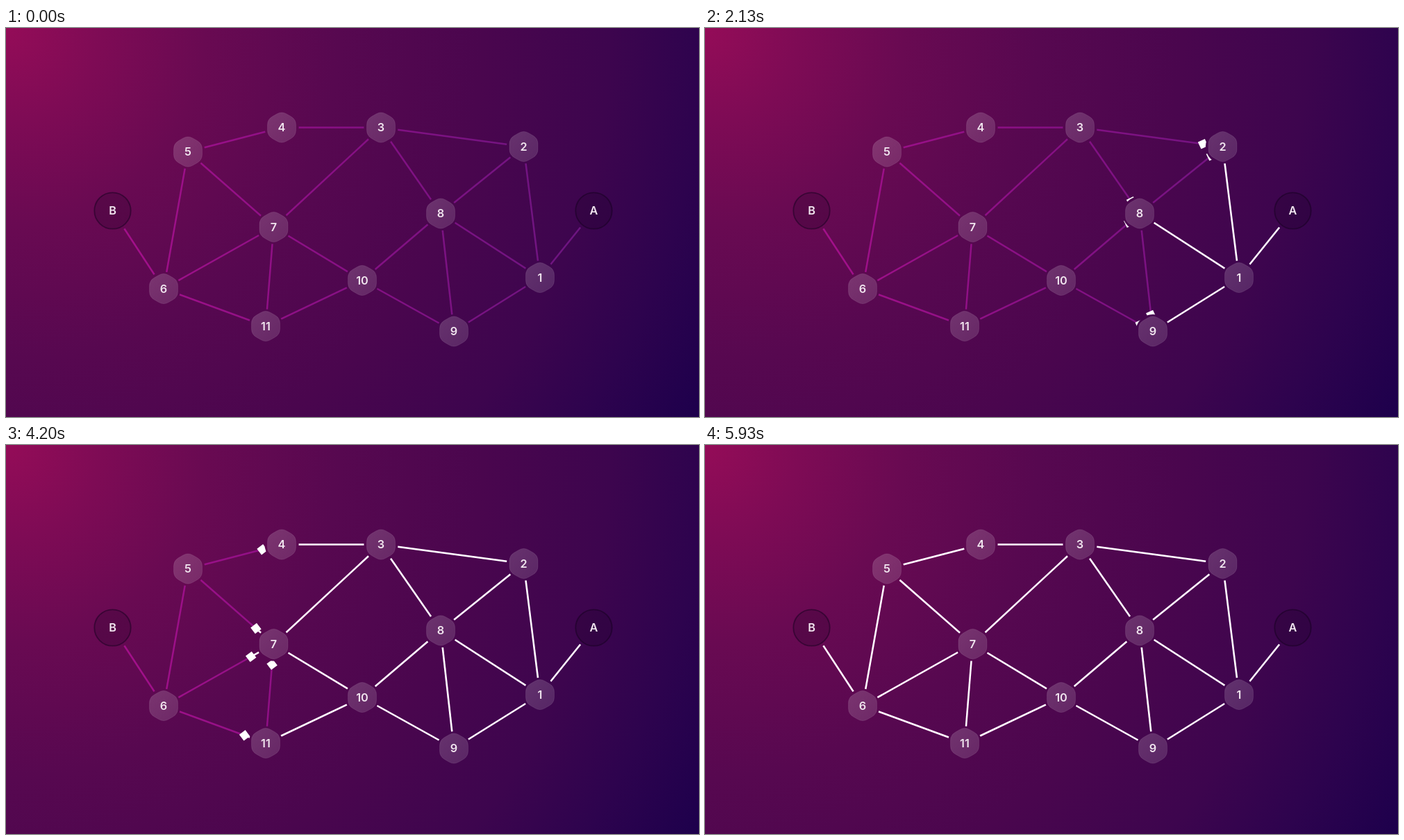
Write an HTML page that moves like this. It is 998 px wide and 561 px high and loops after 5990 ms.

```html
<!DOCTYPE html>
<html lang="en">
<head>
<meta charset="utf-8">
<title>Network flooding</title>
<style>
  html, body { margin: 0; width: 100%; height: 100%; overflow: hidden; background: #4a064e; }
  svg { display: block; width: 100vw; height: 100vh; }
  text { font: 600 16.3px Montserrat, Inter, sans-serif; fill: #f1e6ef; text-anchor: middle; }
</style>
</head>
<body>
<svg id="stage" viewBox="0 0 998 561">
  <defs>
    <radialGradient id="sky" gradientUnits="userSpaceOnUse" cx="0" cy="0" r="1145">
      <stop offset="0" stop-color="#940c58"/>
      <stop offset=".12" stop-color="#7e0b55"/>
      <stop offset=".25" stop-color="#690a52"/>
      <stop offset=".42" stop-color="#570850"/>
      <stop offset=".6" stop-color="#4a064e"/>
      <stop offset=".76" stop-color="#3d054e"/>
      <stop offset=".88" stop-color="#2d034e"/>
      <stop offset="1" stop-color="#1d004c"/>
    </radialGradient>
    <linearGradient id="wire" gradientUnits="userSpaceOnUse" x1="170" y1="0" x2="830" y2="0">
      <stop offset="0" stop-color="#a3108a"/>
      <stop offset=".5" stop-color="#861084"/>
      <stop offset="1" stop-color="#6c1580"/>
    </linearGradient>
    <linearGradient id="glass" x1="0" y1="0" x2="1" y2="1">
      <stop offset="0" stop-color="#fff" stop-opacity=".18"/>
      <stop offset="1" stop-color="#fff" stop-opacity=".13"/>
    </linearGradient>
    <mask id="gaps" maskUnits="userSpaceOnUse" x="0" y="0" width="998" height="561">
      <rect width="998" height="561" fill="#fff"/>
    </mask>
  </defs>
  <rect width="998" height="561" fill="url(#sky)"/>
  <g mask="url(#gaps)" stroke-width="2.5">
    <g id="wires" stroke="url(#wire)"></g>
    <g id="signals" stroke="#fff"></g>
    <g id="packets" fill="#fff"></g>
  </g>
  <g id="nodes"></g>
</svg>
<script>
const LOOP = 5990;
const FRAMES_PER_STAGE = 15;
const TRAVEL_FRAMES = 14.5;

const nodes = {
  A: [846.5, 263.5], B: [153.5, 263.5],
  1: [769, 360], 2: [745.5, 171], 3: [540, 143.5], 4: [397, 143.5],
  5: [262, 178.5], 6: [227, 376], 7: [385.5, 287], 8: [626, 267.5],
  9: [645, 437.5], 10: [513, 364], 11: [374, 430]
};

const stages = [
  "A-1",
  "1-2 1-8 1-9",
  "2-3 2-8 8-3 8-10 9-8 9-10",
  "3-4 3-7 10-7 10-11",
  "4-5 7-5 7-6 7-11 11-6",
  "5-6 6-B"
];

const byId = id => document.getElementById(id);

function add(parent, tag, attrs) {
  const el = document.createElementNS("http://www.w3.org/2000/svg", tag);
  for (const key in attrs) el.setAttribute(key, attrs[key]);
  return parent.appendChild(el);
}

// Pointy-top hexagon with softened corners.
function hexPath(radius, cut) {
  const corner = k => {
    const a = (k * 60 - 90) * Math.PI / 180;
    return [radius * Math.cos(a), radius * Math.sin(a)];
  };
  const toward = (p, q) => p.map((v, i) => v + (q[i] - v) * cut / radius);
  let d = "";
  for (let k = 0; k < 6; k++) {
    const c = corner(k);
    d += `${k ? "L" : "M"}${toward(c, corner(k - 1))}Q${c} ${toward(c, corner(k + 1))}`;
  }
  return d + "Z";
}

const hex = hexPath(23.6, 8);

for (const [name, [x, y]] of Object.entries(nodes)) {
  const terminal = isNaN(name);
  add(byId("gaps"), "circle", { cx: x, cy: y, r: terminal ? 31 : 24.6 });
  const group = add(byId("nodes"), "g", { transform: `translate(${x} ${y})` });
  if (terminal) {
    add(group, "circle", { r: 26.2, fill: "#14001f", "fill-opacity": .2,
      stroke: "#14001f", "stroke-opacity": .5, "stroke-width": 1.8 });
  } else {
    add(group, "path", { d: hex, fill: "url(#glass)", stroke: "#fff", "stroke-opacity": .1 });
  }
  add(group, "text", { y: 5.9 }).textContent = name;
}

const edges = stages.flatMap((list, stage) => list.split(" ").map(pair => {
  const [from, to] = pair.split("-").map(n => nodes[n]);
  const start = { x1: from[0], y1: from[1] };
  // The tiny offset keeps horizontal wires from having an empty bounding box.
  add(byId("wires"), "line", { ...start, x2: to[0], y2: to[1] + .01 });
  return {
    stage, from, to,
    signal: add(byId("signals"), "line", { ...start, x2: from[0], y2: from[1] }),
    packet: add(byId("packets"), "rect", { x: -5.5, y: -5.5, width: 11, height: 11 })
  };
}));

// Frames last 70, 60 and 70 ms in turn.
function frameAt(ms) {
  const rest = ms % 200;
  return 3 * Math.floor(ms / 200) + (rest >= 70) + (rest >= 130);
}

function render(ms) {
  const frame = frameAt(ms);
  for (const { stage, from, to, signal, packet } of edges) {
    const p = Math.min(1, Math.max(0, (frame - stage * FRAMES_PER_STAGE) / TRAVEL_FRAMES));
    const [x, y] = from.map((v, i) => v + (to[i] - v) * p);
    signal.setAttribute("x2", x);
    signal.setAttribute("y2", y);
    packet.setAttribute("transform", `translate(${x} ${y}) rotate(${-180 * p})`);
  }
}

const began = performance.now();
function tick() {
  render((performance.now() - began) % LOOP);
  requestAnimationFrame(tick);
}
tick();
</script>
</body>
</html>
```
